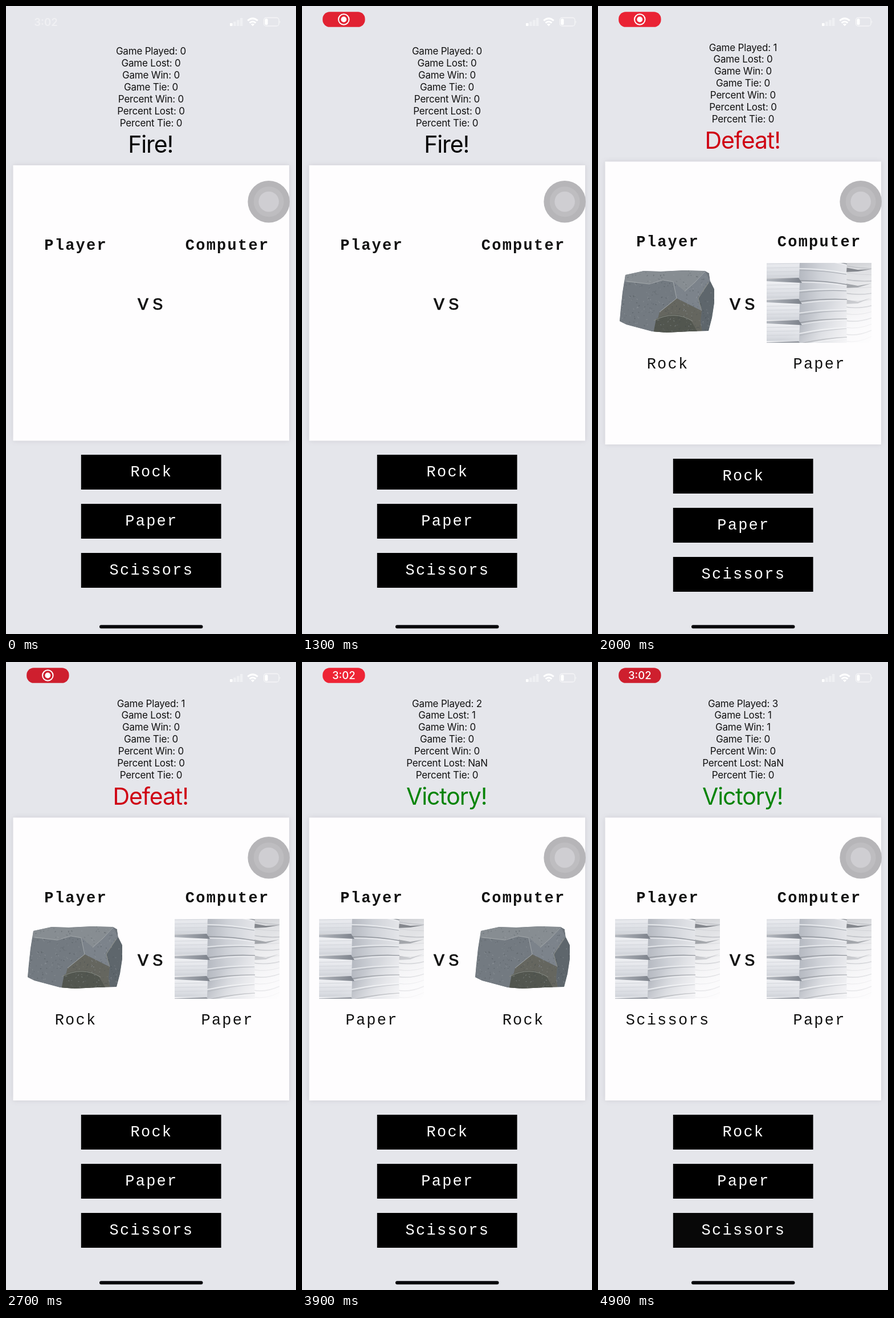
Write an HTML page that moves like this. It is 509 px wide and 1100 px high and loops after 5 s.

```html
<!DOCTYPE html>
<html lang="en">
<head>
<meta charset="utf-8">
<title>Rock Paper Scissors</title>
<style>
  html, body { margin: 0; width: 100%; height: 100%; overflow: hidden; background: #e5e6eb; }
  svg { display: block; width: 100%; height: 100%; }
  text { text-anchor: middle; fill: #111; }
  .ui { font-family: Inter, sans-serif; }
  .stat { font-size: 17px; letter-spacing: -.2px; }
  .result { font-size: 41px; letter-spacing: -1.1px; }
  .mono { font-family: "Liberation Mono", monospace; font-size: 27px; letter-spacing: 2.26px; }
  .bold { font-weight: 700; }
  .vs { font-size: 36px; letter-spacing: 4.2px; stroke: #111; stroke-width: .5px; }
  .button text { fill: #fff; }
  #card { fill: #fefdfe; filter: drop-shadow(0 0 4px rgba(60, 50, 70, .13)); }
</style>
</head>
<body>
<svg id="stage" viewBox="0 0 509 1100">
  <defs>
    <linearGradient id="side">
      <stop offset="0" stop-color="#b4b8c0"/><stop offset=".45" stop-color="#cfd2d8"/><stop offset="1" stop-color="#e4e5e9"/>
    </linearGradient>
    <linearGradient id="front" x2="0" y2="1">
      <stop offset="0" stop-color="#f0f1f4"/><stop offset=".5" stop-color="#e2e4e9"/><stop offset="1" stop-color="#d3d6dc"/>
    </linearGradient>
    <linearGradient id="gap">
      <stop offset="0" stop-color="#b5b9c0"/><stop offset="1" stop-color="#7c818a"/>
    </linearGradient>
    <linearGradient id="back" x1="0" y1="0" x2=".25" y2="1">
      <stop offset="0" stop-color="#b4b6bb"/><stop offset=".3" stop-color="#dfe0e3"/><stop offset="1" stop-color="#f6f6f8"/>
    </linearGradient>
    <linearGradient id="fade" x1=".55" y1=".55" x2="1" y2="1">
      <stop offset="0" stop-color="#fefdfe" stop-opacity="0"/><stop offset="1" stop-color="#fefdfe" stop-opacity=".9"/>
    </linearGradient>
    <clipPath id="frame"><path d="M0 0H184V132L178 140H0Z"/></clipPath>
    <path id="outline" d="M18 21L50 14 80 15 120 13 158 14 165 18 167 32 174 46 174 70 170 96 164 119 130 120 90 122 65 120 20 108 8 102 10 80 13 52Z"/>
    <clipPath id="rockEdge"><use href="#outline"/></clipPath>
    <g id="rock" clip-path="url(#rockEdge)">
      <use href="#outline" fill="#6d747b"/>
      <path fill="#878d92" d="M0 0H160L158 14 140 34 122 50 102 33 84 30 60 37 0 32Z"/>
      <path fill="#737a81" d="M0 32L60 37 84 30 102 33 108 62 78 86 64 140 0 140Z"/>
      <path fill="#7c838b" d="M102 33L122 50 140 34 158 14 167 32 146 62 152 84 108 62Z"/>
      <path fill="#5e666c" d="M167 32L184 46 184 140 156 140 150 103 152 84 146 62Z"/>
      <path fill="#65665f" d="M78 86L108 62 152 84 150 103 156 140 64 140Z"/>
      <path fill="#52564f" d="M72 98Q104 82 132 99L156 140 64 140Z"/>
      <g id="grain"></g>
      <path fill="none" stroke="#a3a8ab" d="M20 32L60 37 84 30 102 33 108 62 78 86M122 50L140 34 158 15"/>
      <path fill="none" stroke="#8c8f88" d="M68 101Q104 82 136 102M152 84L146 62 164 34"/>
    </g>
    <g id="paper" clip-path="url(#frame)"></g>
  </defs>

  <rect width="509" height="1100" fill="#e5e6eb"/>

  <g id="clock" class="ui"><text x="70" y="35" font-size="18.5" font-weight="600" style="fill:#f0f0f3">3:02</text></g>
  <g id="pill">
    <rect id="pillFill" x="36.2" y="10.2" width="74.4" height="26.6" rx="12.5"/>
    <g id="record" fill="#fff">
      <circle cx="73.3" cy="23.5" r="9.3" fill="none" stroke="#fff" stroke-width="2"/>
      <circle cx="73.3" cy="23.5" r="4.9"/>
    </g>
    <text id="pillTime" class="ui" x="73.3" y="30" font-size="18.5" font-weight="500" style="fill:#fff">3:02</text>
  </g>

  <g fill="#fff">
    <rect x="393" y="30" width="4.6" height="5" rx="1"/>
    <path opacity=".4" d="M399.2 27.5h4.4v7.5h-4.4zM405.2 24.5h4.4v10.5h-4.4zM411 21h4.4v14h-4.4z"/>
    <path fill="none" stroke="#fff" stroke-width="3" d="M424.2 25.7Q433 18 441.8 25.7M427.6 29.6Q433 25 438.4 29.6"/>
    <path d="M433 35.2L429.9 32Q433 29.6 436.1 32Z"/>
    <rect x="452.5" y="20.5" width="26.5" height="14.5" rx="4" fill="none" stroke="#fff" stroke-opacity=".6" stroke-width="1.3"/>
    <path opacity=".6" d="M480.4 25.4q2.2 2.3 0 4.8z"/>
    <rect x="454.3" y="22.3" width="5.2" height="10.9" rx="2"/>
  </g>

  <g id="stats" class="ui"></g>
  <text id="result" class="ui result" x="253.7"></text>
  <rect id="card" x="12.5" width="484.5"/>
  <g id="heads"></g>
  <use id="leftPic" x="30" y="450"/>
  <use id="rightPic" x="296" y="450"/>
  <g id="labels"></g>
  <g id="buttons"></g>

  <circle cx="461.2" cy="342.7" r="36.8" fill="#b6b5b8"/>
  <circle cx="461.2" cy="342.7" r="26.5" fill="#bebdc0"/>
  <circle cx="461.2" cy="342.7" r="17.8" fill="#cfced2"/>
  <rect x="164" y="1084.3" width="181.5" height="6" rx="3" fill="#07070b"/>
</svg>

<script>
const LOOP = 5000, STEP = 100;
const NAMES = ["Rock", "Paper", "Scissors"];
const STATS = ["Game Played", "Game Lost", "Game Win", "Game Tie", "Percent Win", "Percent Lost", "Percent Tie"];
const RELEASES = [1585, 3180, 4687];

const ROUNDS = [
  { at: 0, stats: [0, 0, 0, 0, 0, 0, 0], result: "Fire!", color: "#050505", picks: ["", ""] },
  { at: RELEASES[0], stats: [1, 0, 0, 0, 0, 0, 0], result: "Defeat!", color: "#cf0414", picks: ["Rock", "Paper"] },
  { at: RELEASES[1], stats: [2, 1, 0, 0, 0, "NaN", 0], result: "Victory!", color: "#078407", picks: ["Paper", "Rock"] },
  { at: RELEASES[2], stats: [3, 1, 1, 0, 0, "NaN", 0], result: "Victory!", color: "#078407", picks: ["Scissors", "Paper"] }
];

// Pictures load on their own schedule: [time, left, right]
const PICTURES = [
  [0, "", ""],
  [RELEASES[0], "", "paper"],
  [2000, "rock", "paper"],
  [RELEASES[1], "paper", "rock"],
  [RELEASES[2], "paper", "paper"]
];

const $ = id => document.getElementById(id);

function add(parent, tag, attrs) {
  const el = document.createElementNS("http://www.w3.org/2000/svg", tag);
  for (const key in attrs) el.setAttribute(key, attrs[key]);
  return parent.appendChild(el);
}

function addMono(parent, x, y, text, cls = "") {
  const el = add(parent, "text", { class: "mono " + cls, x, y });
  el.textContent = text;
  return el;
}

function drawGrain() {
  let seed = 7;
  const rand = () => (seed = seed * 16807 % 2147483647) / 2147483647;
  for (let i = 0; i < 420; i++) {
    const x = 8 + rand() * 168, y = 12 + rand() * 110;
    const d = `M${x} ${y}l${rand() * 5 - 2.5} ${rand() * 4 - 1}`;
    add($("grain"), "path", { d, stroke: i % 2 ? "#a2a8ad" : "#41484d", "stroke-width": 1.3, opacity: .15 + rand() * .3 });
  }
}

function drawPaper() {
  const g = $("paper");
  const poly = (points, fill) => add(g, "polygon", { points, fill });
  const line = (d, stroke, width = 1) => add(g, "path", { d, stroke, "stroke-width": width, fill: "none" });

  add(g, "rect", { width: 184, height: 140, fill: "url(#back)" });
  for (let i = 0; i < 12; i++) {
    const y = 5 + i * 12;
    line(`M138 ${y}Q160 ${y + 4} 184 ${y - i * 1.2 + 5}`, i % 2 ? "#d2d3d7" : "#bfc1c6", i % 2 ? 1 : 1.6);
  }
  for (let i = 0; i < 3; i++) {
    const y = 10 + i * 28;
    poly(`138,${y - 2} 160,${y + 2} 184,${y + 1 - i * 3} 160,${y + 5} 138,${y + 6}`, ["#84878d", "#a2a5aa", "#bbbdc2"][i]);
  }

  const left = [-12, 10, 31, 49, 68, 88, 105, 124, 142, 160];
  const right = [2, 18, 38, 47, 64, 82, 98, 113, 130, 146];
  for (let i = 0; i < left.length - 1; i++) {
    const a = left[i], b = left[i + 1], c = right[i], d = right[i + 1];
    poly(`56,${a} 100,${(a + c) / 2 - 2} 141,${c} 140,${d} 100,${(b + d) / 2 - 2} 56,${b}`, "url(#side)");
    line(`M56 ${a}Q100 ${(a + c) / 2 - 4} 141 ${c}`, i % 2 ? "#eceef1" : "#92969d", 1.4);
    line(`M58 ${a + 3}Q100 ${(a + c) / 2 - 1} 140 ${c + 2}`, i % 2 ? "#a5a9b0" : "#eff0f3", 1.2);
  }

  for (const y of [-6, 31, 68, 105, 142]) {
    poly(`0,${y} 58,${y + 2} 57,${y + 32} 0,${y + 32}`, "url(#front)");
    for (let k = 8; k < 30; k += 7) line(`M0 ${y + k}L57 ${y + k - 1}`, "#cdd0d6", .8);
    poly(`0,${y - 3} 56,${y - 5} 62,${y + 4} 0,${y + 1}`, "url(#gap)");
  }
  add(g, "rect", { width: 184, height: 140, fill: "url(#fade)" });
}

drawGrain();
drawPaper();
const statRows = STATS.map(() => add($("stats"), "text", { class: "stat", x: 254.5 }));
const heads = [addMono($("heads"), 122.6, 0, "Player", "bold"), addMono($("heads"), 388.6, 0, "Computer", "bold")];
addMono($("heads"), 255.6, 531.5, "vs", "vs");
const labels = [addMono($("labels"), 122.6, 635, ""), addMono($("labels"), 388.6, 635, "")];
const buttons = NAMES.map((name, i) => {
  const g = add($("buttons"), "g", { class: "button" });
  add(g, "rect", { x: 131.8, y: 786 + i * 86, width: 245.8, height: 61 });
  addMono(g, 255.4, 824 + i * 86, name);
  return g;
});

const clamp = v => Math.min(1, Math.max(0, v));
const ramp = (t, from, to) => clamp((t - from) / (to - from));
const ease = u => u < .5 ? 2 * u * u : 1 - 2 * (1 - u) ** 2;
const pressed = dt => dt < 0 ? 1 - .8 * ease(ramp(dt, -150, 0)) : .2 + .8 * ease(ramp(dt, 0, 250));

function showRound(r, shift) {
  statRows.forEach((el, i) => {
    el.setAttribute("y", 85 - shift + i * 20.95);
    el.textContent = `${STATS[i]}: ${r.stats[i]}`;
  });
  $("result").setAttribute("y", 256.5 - shift);
  $("result").style.fill = r.color;
  $("result").textContent = r.result;
  $("card").setAttribute("y", 279 - shift);
  $("card").setAttribute("height", 482.5 + 2 * shift);
  heads.forEach(el => el.setAttribute("y", 427 - shift));
  labels.forEach((el, i) => el.textContent = r.picks[i]);
  $("buttons").setAttribute("transform", `translate(0 ${shift ? 7 : 0})`);
}

function showPill(t) {
  const glow = .5 - .5 * Math.cos((t - 670) / 2200 * 2 * Math.PI);
  const mix = (a, b) => Math.round(a + (b - a) * glow);
  $("pillFill").setAttribute("fill", `rgb(${mix(204, 238)},${mix(31, 36)},${mix(46, 53)})`);
  $("pill").setAttribute("opacity", ramp(t, 0, 400));
  $("clock").setAttribute("opacity", 1 - ramp(t, 0, 200));
  const swap = ramp(t, 2850, 3150);
  $("record").setAttribute("opacity", 1 - swap);
  $("pillTime").setAttribute("opacity", swap);
}

function render(t) {
  const round = ROUNDS.findLast(r => r.at <= t);
  showRound(round, round.at ? 6.5 : 0);
  const [, left, right] = PICTURES.findLast(p => p[0] <= t);
  $("leftPic").setAttribute("href", "#" + left);
  $("rightPic").setAttribute("href", "#" + right);
  buttons.forEach((g, i) => g.setAttribute("opacity", pressed(t - RELEASES[i])));
  showPill(t);
}

const start = performance.now();
function tick() {
  const t = (performance.now() - start) % LOOP;
  render(Math.floor(t / STEP) * STEP);
  requestAnimationFrame(tick);
}
tick();
</script>
</body>
</html>
```
